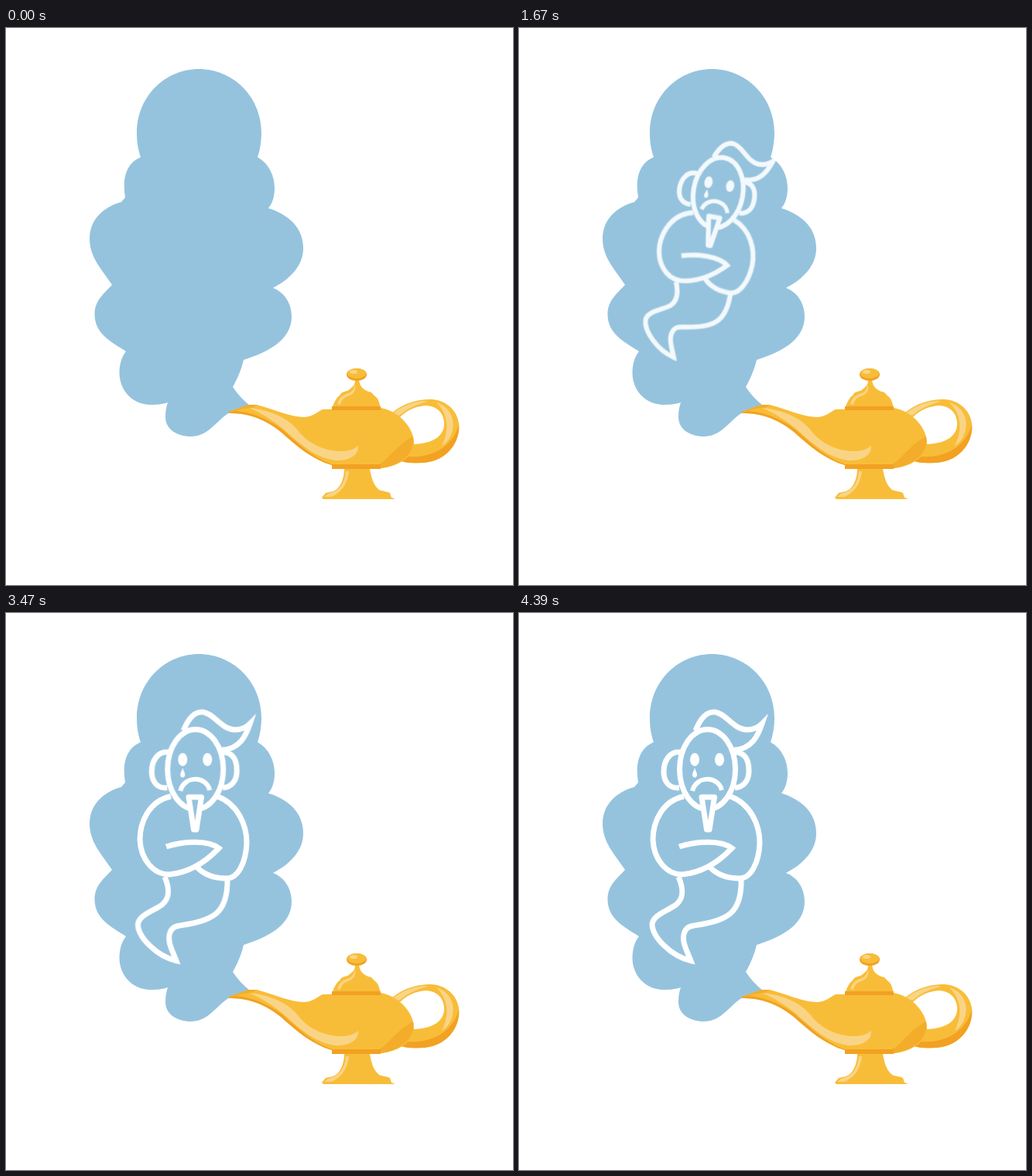
These frames come from a looping animation (655 by 720 pixels, 4.97 s). An HTML page:

```html
<!DOCTYPE html>
<html lang="en">
<head>
<meta charset="utf-8">
<title>Genie and lamp</title>
<style>
  html, body { margin: 0; width: 100%; height: 100%; overflow: hidden; background: #fff; }
  svg { display: block; width: 100%; height: 100%; }

  .smoke { fill: #95c3de; }
  .gold { fill: #f8bd38; }
  .shade { fill: #f2a122; }
  .soft-shade { fill: #f3ad2b; }
  .shine { fill: #fad486; }

  .genie, .head, .tail { animation: 4970ms linear infinite; }
  .genie {
    fill: none; stroke: #fff; stroke-width: 7; stroke-miterlimit: 8;
    transform-origin: 245px 289px;
    animation-name: appear;
  }
  .face { fill: #fff; stroke: none; }
  .head { --right: translateX(3px); --left: translateX(-3px); animation-name: sway; }
  .tail {
    --right: skewX(-1.4deg); --left: skewX(1.4deg);
    transform-origin: 245px 240px;
    animation-name: sway;
  }

  /* Grow and turn upright while fading in, one step per 40 ms */
  @keyframes appear {
    0% { opacity: 0; transform: rotate(90deg) scale(0); }
    13.481% { opacity: 0; transform: rotate(90deg) scale(0); animation-timing-function: steps(9); }
    20.724% { opacity: .34; transform: rotate(59.4deg) scale(.34); animation-timing-function: steps(19); }
    36.016% { opacity: .99; transform: rotate(.9deg) scale(.99); animation-timing-function: steps(1); }
    36.821%, 100% { opacity: 1; transform: rotate(0deg) scale(1); }
  }

  /* Head and tail swing in opposite directions, with a pause at the first turn */
  @keyframes sway {
    0% { transform: none; }
    48.692% { transform: none; animation-timing-function: steps(5); }
    52.716% { transform: var(--right); }
    56.137% { transform: var(--right); animation-timing-function: steps(10); }
    64.185% { transform: var(--left); animation-timing-function: steps(10); }
    72.233% { transform: var(--right); animation-timing-function: steps(10); }
    80.282% { transform: var(--left); animation-timing-function: steps(10); }
    88.32% { transform: var(--right); }
    88.33%, 100% { transform: none; }
  }
</style>
</head>
<body>
<svg viewBox="0 0 655 720">
  <path class="smoke" d="M174 167 C170 155 169 146 169 136 C169 88 206 53 249.500 53 C293 53 330 88 330 136
    C330 147 328 158 325 167 C340 175 347 192 347 207 C347 218 344 227 339 233
    C365 241 384 258 384 285 C384 308 366 325 345 336 C360 342 369 356 369 373
    C369 405 335 420 307 429 C304 442 298 455 293 464 C299 473 306 481 315 488 L289 497
    C275 504 262 528 240 528 C221 528 206 519 206 503 C206 495 207 490 209 484
    C200 487 192 487 185 487 C163 486 146.500 468 146.500 446 C146.500 434 150 424 155 418
    C135 405 114.500 395 114.500 370 C114.500 352 127 343 137 332 C124 312 108 297 108 272
    C108 245 130 230 149 225 L154 219 C150 195 155 175 174 167Z"/>

  <g class="lamp">
    <path class="gold" d="M498 498 C512 485 534 479 550 480 C575 482 588 502 585 522 C581 546 561 561 537 562
      C523 563 513 562 505 558 L522 538 C548 538 564 530 566 514 C567 499 558 489 543 488 C529 489 518 494 509 503Z"/>
    <path class="shine" d="M500 498 C513 487 532 481 545 482 C536 486 521 489 508 501Z"/>
    <path class="shine" d="M556 484 C572 489 580 503 577 519 C575 529 570 536 563 540 C572 522 573 501 556 484Z"/>
    <path class="shade" d="M585 513 C586 542 563 562 537 562 C523 563 513 562 505 558 L511 553 C540 558 575 548 585 513Z"/>

    <path class="gold" d="M437 570 C437 585 430 597 422 599 L413 601 L408 607 L410 609 H503 L498 607 L496 601
      C490 598 484 599 481 596 C474 590 472 580 470 570Z"/>
    <path class="shine" d="M439 573 H443 C441 591 432 601 420 606 H411 L416 602 C430 599 438 589 439 573Z"/>

    <path class="gold" d="M288 496 L313 487 H324 C350 494 368 503 385 503 C398 502 402 496 409 493
      L484 491 C506 495 527 515 527 537 C527 555 505 570 470 570 H421 V565
      C396 558 375 540 355 522 C334 505 311 497 288 498Z"/>
    <path class="soft-shade" d="M526 528 C530 554 503 570 470 570 C494 562 500 541 526 528Z"/>
    <path class="shade" d="M288 495 C312 494 335 503 357 519 C377 537 396 555 421 564 H484 V570 H421 V565
      C396 558 375 540 355 522 C334 505 311 497 288 498Z"/>
    <path class="shine" d="M314 491 C342 494 364 504 377 520 C391 539 415 548 437 547 C446 546 452 543 455 540
      C456 553 442 560 425 559 C398 555 378 536 358 518 C343 506 330 498 314 491Z"/>
    <path class="soft-shade" d="M288 496 L313 487 H324 L318 491 C308 491 298 494 288 498Z"/>

    <path class="gold" d="M421 493 C424 482 428 477 431 475 C435 468 440 471 444 467 C449 463 451 461 451 455
      H456 C457 463 461 467 468 470 C473 470 474 474 477 476 C481 479 483 485 484 493Z"/>
    <path class="shine" d="M428 486 C431 476 437 474 443 472 C448 470 449 466 451 461 C453 472 445 475 439 477
      C434 480 433 483 432 487Z"/>
    <path class="shade" d="M421 489 H484 V494 H421Z"/>
    <ellipse class="shade" cx="453" cy="448" rx="13" ry="8"/>
    <ellipse class="gold" cx="453" cy="446.500" rx="12" ry="6.500"/>
    <ellipse class="shine" cx="449" cy="444.500" rx="5" ry="2.500"/>
  </g>

  <g class="genie">
    <g class="tail">
      <path d="M206 341 C212 355 214 368 203 377 C190 386 174 390 172 402
        C172 419 197 444 222 449.500 C217 436 209 424 214 412 C218 403 225 405 243 401
        C271 395 288 385 287 344"/>
    </g>
    <path d="M213 237 C185 243 173 270 173 293 C174 318 190 338 211 338
      C232 336 255 325 275 304 C262 294 232 294 207 302"/>
    <path d="M273 237 C300 247 311 275 311 297 C310 322 300 343 285 343 C270 343 256 338 247 329"/>
    <g class="head">
      <path d="M209 180 C195 178 187 191 187 205 C187 218 194 227 207 226"/>
      <path d="M279 180 C292 180 297 190 297 204 C297 217 290 225 279 226"/>
      <path d="M228 152 C234 137 242 127 253 128 C268 130 275 149 294 151
        C303 151 309 148 314 143 C309 158 301 176 278 177"/>
      <ellipse cx="243.500" cy="202" rx="36" ry="51.500"/>
      <path d="M224 230 C229 210 257 210 262 229" stroke-width="6"/>
      <g class="face">
        <ellipse cx="227" cy="189.500" rx="6" ry="8.500"/>
        <ellipse cx="259" cy="189.500" rx="6" ry="8.500"/>
        <path d="M227 200 C228 204 230 206 230 209 C230 214 224 214 224 209 C224 206 226 204 227 200Z"/>
      </g>
    </g>
    <path class="smoke" d="M236 238 H252.500 L246 280 H242.500Z" stroke-linejoin="round"/>
  </g>
</svg>
</body>
</html>
```
